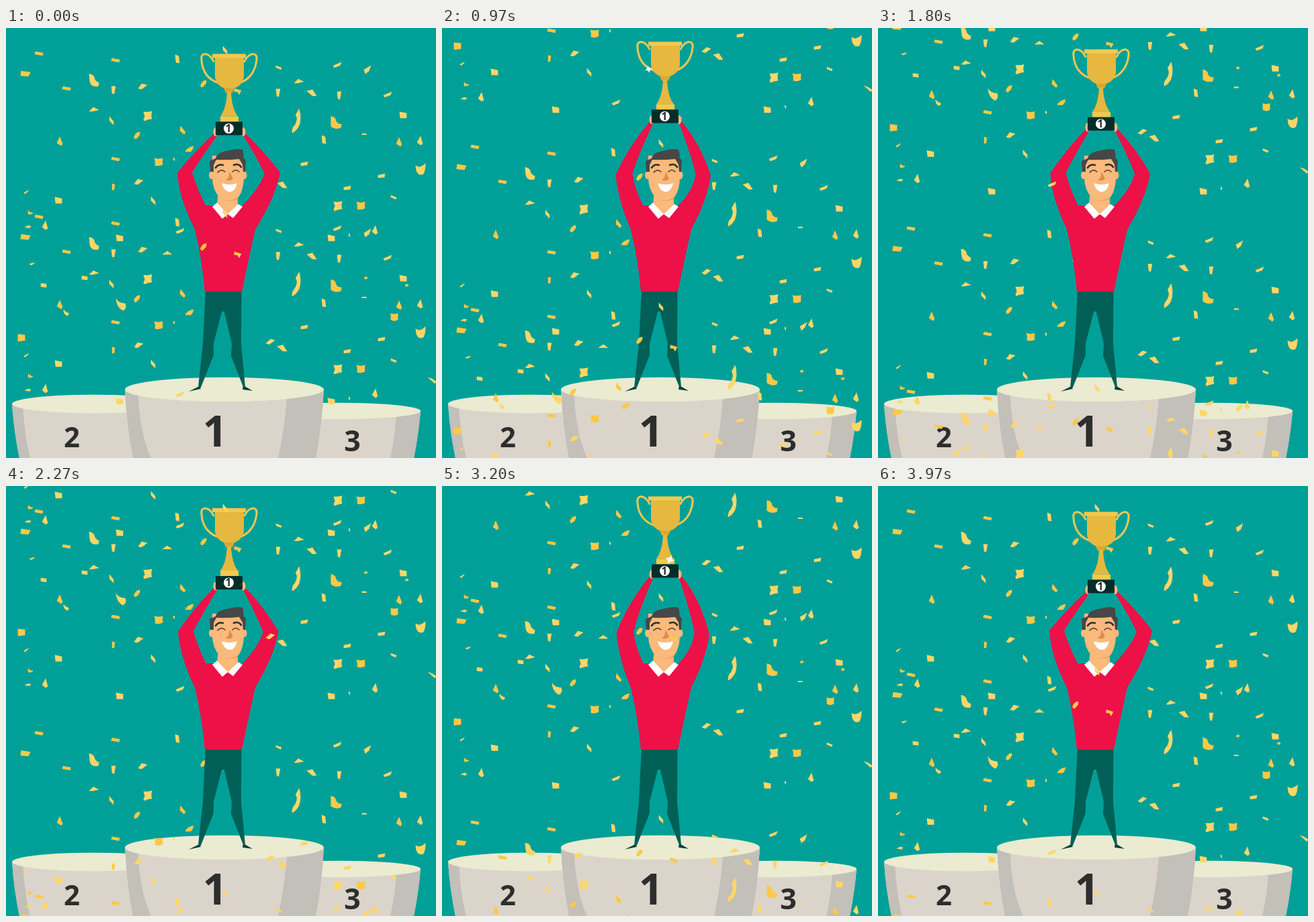
Write an HTML page with a canvas that moves like this. It is 640 px wide and 640 px high and loops after 4.01 s.

```html
<!DOCTYPE html>
<html lang="en">
<head>
<meta charset="utf-8">
<title>Winner on the podium</title>
<style>
html, body { margin: 0; height: 100%; overflow: hidden; background: #00a099; }
canvas { display: block; width: 640px; height: 640px; }
</style>
</head>
<body>
<canvas id="stage" width="640" height="640"></canvas>
<script>
const ctx = document.getElementById('stage').getContext('2d');
const LOOP = 4010;
const FALL = 573;   // confetti travel in one loop
const STEPS = 99;
const GOLD = '#ffd666', AMBER = '#ffc845', STONE = '#dbd4ca', SHADE = '#c3bfb9',
      TOP = '#eaebd0', RED = '#ed1148', SKIN = '#fbb97b', INK = '#2d2d2d';

// Bursts of evenly spaced steps: start, end, number of steps
const BURSTS = [[30, 530, 13], [570, 1070, 14], [1130, 1630, 14], [1670, 2170, 13],
  [2200, 2670, 13], [2730, 3230, 14], [3270, 3770, 13], [3800, 3970, 5]];

// Confetti by shape: colour, outline, x/y pairs
const CONFETTI = [
  [AMBER, 'M-5-3 6-1 5 3-6 1z', [49, 38, 90, 90, 163, 48, 163, 195]],
  [GOLD, 'M-4-3 4 0 3 3-4 0z', [406, 59, 577, 252]],
  [AMBER, 'M-6-4 7-2 4 4-7 3z', [29, 68]],
  [GOLD, 'M-5-1 5-3 4 2-5 3z', [444, 202, 508, 238, 559, 220]],
  [GOLD, 'M-6 1 6-4 4 1-4 4z', [493, 55, 568, 99, 259, 302]],
  [GOLD, 'M-3-1 3-1 4 1-3 1z', [533, 158]],
  [GOLD, 'M-3-5 3-5 1 6-2 5z', [160, 92, 405, 96, 496, 100]],
  [AMBER, 'M-2-5 2-4 1 4-2 4z', [160, 237]],
  [GOLD, 'M-3-6 2-4 3 6-2 5z', [255, 46, 473, 166]],
  [GOLD, 'M-6 3-1-4 7-2-1 4z', [203, 87, 197, 229]],
  [GOLD, 'M-7 2-1-4 7 0-2 2z', [131, 122, 436, 80]],
  [GOLD, 'M-7-3 1-5 7 4 1 4z', [455, 97, 411, 234]],
  [GOLD, 'M-7 2 0-4 6-2-2 4z', [394, 224]],
  [GOLD, 'M-3-6 3 1 3 6-3 0z', [157, 138, 219, 257, 326, 33]],
  [AMBER, 'M0-7 4 3 2 6-4 2z', [80, 169, 585, 170]],
  [AMBER, 'M-3-6 4 3 2 6-4 1z', [263, 152]],
  [GOLD, 'M1-7 4 4 1 6-4 2z', [58, 294, 616, 168, 549, 301]],
  [GOLD, 'M-5 0 5-6 2 2-3 6z', [538, 62]],
  [AMBER, 'M-5-4 5-1 2 5-1 1-5 1z', [345, 94]],
  [GOLD, 'M-5-5 5-3 5 4-4 4z', [78, 257, 169, 313, 591, 130, 484, 313]],
  [GOLD, 'M-6-6Q1-5 6-7Q4 0 6 4Q0 5-5 7Q-7 4-4 1z', [211, 131, 494, 265]],
  [AMBER, 'M-6-5Q0-3 6-5Q5 0 6 4Q0 7-5 5Q-4 0-6-5z', [227, 199, 528, 264]],
  [GOLD, 'M-7-9Q0-9 1-2Q3 2 7 3L6 8Q-5 10-6 1z', [131, 78]],
  [AMBER, 'M-7-9Q0-8 0-3Q2 2 8 2L7 7Q-1 10-7 5z', [491, 141]],
  [AMBER, 'M-4 1Q-1-5 4-5Q5 1-2 5Q-5 4-4 1z', [195, 160, 294, 83]],
  [AMBER, 'M-6 4Q-3-3 6-4Q5 1 2 4z', [273, 180]],
  [GOLD, 'M4-17Q8-4 4 7Q0 15-6 17Q-6 9-2 6Q3-2-1-8z', [432, 138]],
  [GOLD, 'M-7-5Q-2-2 1-4Q4-5 7-8Q7 2 4 7Q-3 10-6 2z', [617, 210]],
  [GOLD, 'M-4 1 3-3 1 0-3 3z', [31, 244]],
  [AMBER, 'M-3-3Q-2 0 4 1Q3 4-3 3z', [36, 274]],
  [GOLD, 'M-5 1Q0-4 5 0Q1-1 3 2Q-1 1-5 1z', [33, 296]],
  [GOLD, 'M-1-2 1-1 1 3-1 1z', [250, 195, 511, 308]]
];

// Pieces that only the front sheets carry
const EXTRAS = [
  [GOLD, 'M-4 0 4-2 1 1-2 2z', [39, 108]],
  [GOLD, 'M-7 2 0-3 7 2z', [240, 92]],
  [GOLD, 'M-4-3 4-2 4 3-4 2z', [117, 129, 56, 140]],
  [GOLD, 'M-7-8Q-3-1 6-1Q9 5 3 9Q-6 5-7-8z', [171, 168]],
  [GOLD, 'M-3-5Q-1-1 4 0Q5 4 1 4Q-4 1-3-5z', [89, 181]],
  [AMBER, 'M-5-5 5-4 5 4-5 5z', [23, 218]],
  [AMBER, 'M-5-5Q0-3 5-5L5 4Q0 7-5 4z', [578, 187]],
  [AMBER, 'M-2-1 2-2 3 1-1 2z', [596, 140, 535, 129]],
  [GOLD, 'M-6-4 0-2 6 2 4 5z', [634, 281]]
];

for (const piece of [...CONFETTI, ...EXTRAS]) piece[1] = new Path2D(piece[1]);

const fill = (d, color) => { ctx.fillStyle = color; ctx.fill(new Path2D(d)); };

function line(d, color, width) {
  ctx.strokeStyle = color;
  ctx.lineWidth = width;
  ctx.lineCap = 'round';
  ctx.stroke(new Path2D(d));
}

function oval(x, y, rx, ry, color) {
  ctx.fillStyle = color;
  ctx.beginPath();
  ctx.ellipse(x, y, rx, ry, 0, 0, 7);
  ctx.fill();
}

function digit(s, x, y, size) {
  ctx.font = `bold ${size}px "Open Sans", sans-serif`;
  ctx.textAlign = 'center';
  ctx.fillStyle = INK;
  ctx.fillText(s, x, y);
}

function sheet(pieces, dy) {
  for (const [color, path, spots] of pieces) {
    ctx.fillStyle = color;
    for (let i = 0; i < spots.length; i += 2) {
      ctx.save();
      ctx.translate(spots[i], spots[i + 1] + dy);
      ctx.scale(1.08, 1.08);
      ctx.fill(path);
      ctx.restore();
    }
  }
}

function podium() {
  fill('M9 560Q12 602 20 640H200V560z', STONE);
  fill('M9 560Q12 602 20 640H36Q27 605 25 560z', SHADE);
  oval(130, 559.5, 121, 13.8, TOP);

  fill('M440 570V640H607Q614 605 617 570z', STONE);
  fill('M581 570Q580 605 572 640H607Q614 605 617 570z', SHADE);
  oval(496, 570, 121, 12.3, TOP);

  fill('M177 538Q180 595 189 640H461Q470 595 473 538z', STONE);
  fill('M177 538Q180 595 189 640H216Q199 605 196 538z', SHADE);
  fill('M419 538Q416 590 405 640H461Q470 595 473 538z', SHADE);
  oval(325, 538, 148, 18, TOP);

  digit('1', 311, 623, 64);
  digit('2', 98, 624, 42);
  digit('3', 515.5, 629.5, 43);
}

function trophy() {
  oval(312, 154, 3.5, 6.5, SKIN);
  oval(353, 154, 3.5, 6.5, SKIN);
  line('M309 49C302 35 289 35 291 47C292 64 301 78 320 82', '#f3c74f', 3);
  line('M355 49C362 35 375 35 373 47C371 64 362 78 344 82', '#f3c74f', 3);
  fill('M311 43H354V72Q352 88 332 91Q313 88 311 72z', '#e6b83f');
  fill('M307 38H357V44H307z', '#f5c84e');
  fill('M324 89H340L337 96H327z', '#d9a932');
  fill('M329 95H335Q336 119 345 131H319Q328 119 329 95z', '#e6b83f');
  fill('M319 131H346V139H319z', '#f5c84e');
  fill('M312 139H352V159H312z', '#042d2a');
  oval(331.5, 149, 7.5, 7.5, '#fff');
  digit('1', 331, 154.5, 15.5);
}

function star(x, y, r, turn) {
  if (r <= 0) return;
  ctx.save();
  ctx.translate(x, y);
  ctx.rotate(turn);
  ctx.scale(r, r);
  fill('M0-1Q.12-.12 1 0Q.12.12 0 1Q-.12.12-1 0Q-.12-.12 0-1z', '#fff');
  ctx.restore();
}

function sparkles(phase) {
  const glow = (peak, span) => 1 - Math.abs(phase - peak) / span;
  star(299, 42, 15 * glow(12.5, 5), 0);
  star(307.5, 79, 12 * glow(21.5, 5), -.25);
  star(339, 132, 11 * glow(32, 5), .35);
}

function arms(u) {
  const m = (a, b) => a + (b - a) * u;
  const y = 158.6 - 25 * u;
  fill(`M309 ${y - 1}Q${m(281, 276)} ${m(184, 174)} ${m(255, 260)} ${m(215, 219)}
    Q${m(257, 263)} ${m(252, 256)} 281 300H325L306 264L${m(297, 300)} 264
    Q${m(284, 288)} ${m(238, 240)} ${m(277, 286)} ${m(215, 218)}
    Q${m(293, 290)} ${m(190, 192)} 314 ${y + 2}z`, RED);
  fill(`M357 ${y - 1}Q${m(384, 386)} ${m(184, 170)} ${m(408, 397)} ${m(215, 221)}
    Q${m(402, 393)} ${m(250, 256)} 371 300H330L352 264
    Q${m(376, 372)} ${m(240, 244)} ${m(385, 375)} ${m(217, 218)}
    Q${m(372, 369)} ${m(190, 185)} 353 ${y + 2}z`, RED);
}

function man(u) {
  fill('M272 541L288 533 290 537z', '#013f3a');
  fill('M353 532L367 540 352 538z', '#013f3a');
  fill(`M297 390H350.5L350 470 356 534H353L335 488 336 470 325 423Q323 420 321 423
    L309 470V487L290 535H286L293 470z`, '#006057');

  arms(u);
  fill('M281 300L301 264H355L371 300Q362 340 351 392.5H296Q291 340 281 300z', RED);

  fill('M316 245H345V264L330 278 314 262z', SKIN);
  fill('M318 249Q332 262 345 249V254Q333 261 318 253z', '#d58f54');
  fill('M314 260L330 277 322 284 307 266z', '#fff');
  fill('M346 262L330 277 338 283 352 266z', '#fff');

  oval(306, 219, 4, 6, SKIN);
  oval(354.5, 219, 4, 6, SKIN);
  fill('M307 190H354V222Q354 240 346 252Q332 261 318 253Q307 240 307 222z', SKIN);
  fill(`M304 214L303 198 312 194Q314 185 329 183Q341 179 352 181Q354 188 354 194
    L357 197 356 214H353L352 203 347 195Q329 197 313 196L309 204V214z`, '#474747');
  line('M312 208Q316 202 323 204', '#2b3030', 2.6);
  line('M339 204Q346 201 350 207', '#2b3030', 2.6);
  line('M315 215Q320 209 326 214', '#4a3a30', 1.5);
  line('M337 214Q342 209 347 214', '#4a3a30', 1.5);
  fill('M333 214L338 225Q332 229 327 226L331 223z', '#db8d4e');
  fill('M321 231Q333 235 344 231Q341 244 333 244Q324 243 321 231z', '#fff');
}

function frameAt(t) {
  let first = 1, step = 0;
  for (const [start, end, count] of BURSTS) {
    if (t < start) break;
    step = first + Math.min(count - 1, Math.round((t - start) / (end - start) * (count - 1)));
    first += count;
  }
  return step;
}

function draw(now) {
  const step = frameAt(now % LOOP);
  const phase = step % 49.5;
  const lift = phase < 33 ? phase / 33 : (49.5 - phase) / 16.5;
  const fall = FALL * step / STEPS;

  ctx.fillStyle = '#00a099';
  ctx.fillRect(0, 0, 640, 640);
  podium();
  for (const dy of [fall, fall - FALL]) sheet(CONFETTI, dy);

  man(lift);
  ctx.save();
  ctx.translate(0, .6 - 25 * lift);
  trophy();
  sparkles(phase);
  ctx.restore();

  for (const dy of [fall + 243, fall + 243 - FALL]) {
    sheet(CONFETTI, dy);
    sheet(EXTRAS, dy);
  }
}

const origin = performance.now();
function tick() {
  draw(performance.now() - origin);
  requestAnimationFrame(tick);
}
tick();
</script>
</body>
</html>
```
